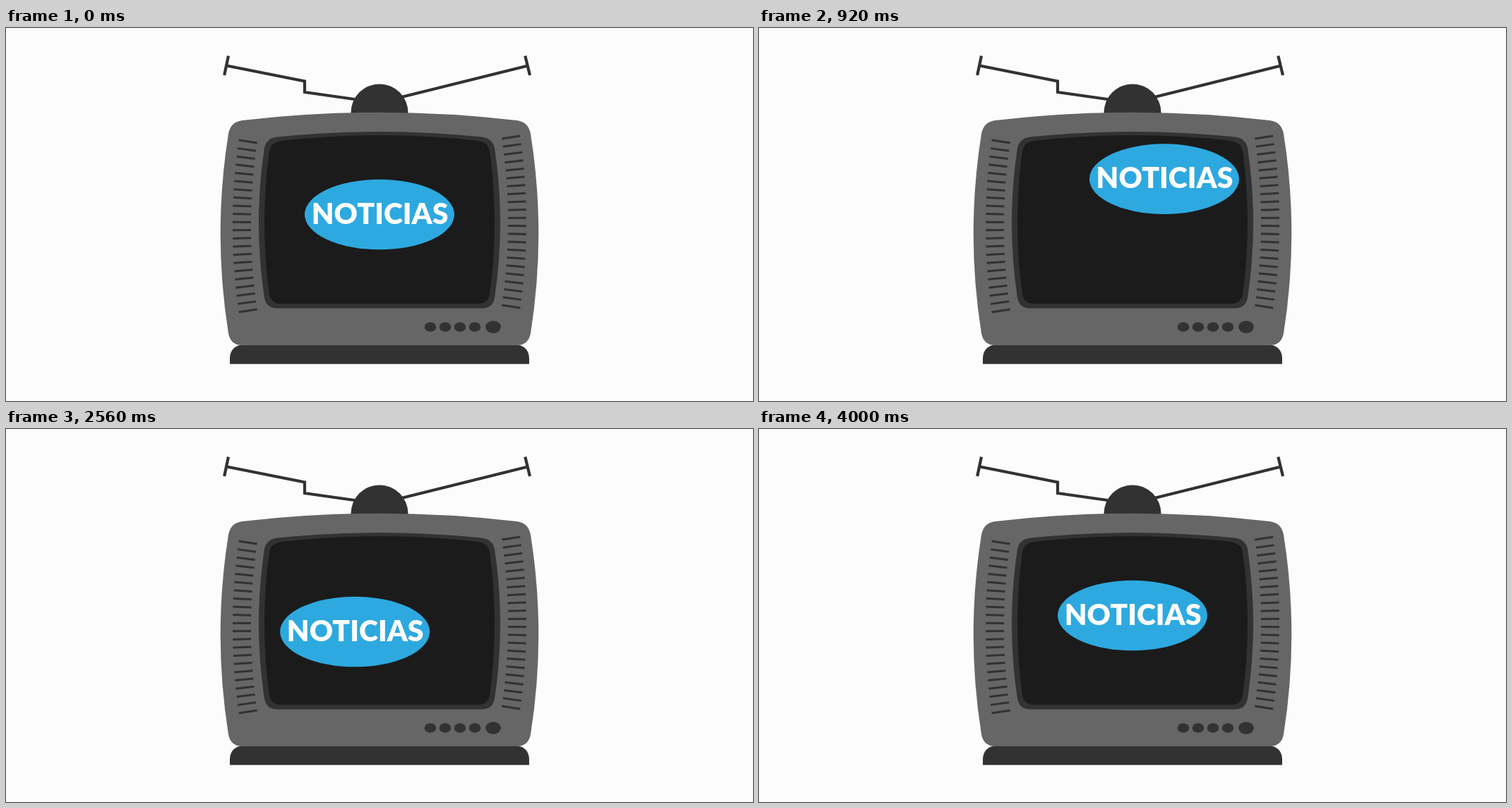
Write an HTML page that moves like this. It is 1058 by 529 pixels and loops after 4040 ms.

```html
<!DOCTYPE html>
<html lang="es">
<head>
<meta charset="utf-8">
<title>Noticias</title>
<style>
  html, body { margin: 0; width: 100%; height: 100%; overflow: hidden; background: #fcfcfc; }
  svg { display: block; width: 100%; height: 100%; }
  text { font: 900 41px Lato, "Open Sans", sans-serif; text-anchor: middle; fill: #fcfcfc; }
</style>
</head>
<body>
<svg viewBox="0 0 1058 529">
  <defs><clipPath id="clip"><path id="clipPath"/></clipPath></defs>
  <g fill="none" stroke="#323232" stroke-width="4.2">
    <path d="M313 53.5L423 75.5V91L497 101.500M315 39.500L309.200 67"/>
    <path d="M558 98.500L739 53.500M735.300 39.500L742 67"/>
  </g>
  <circle cx="529" cy="120" r="40.5" fill="#323232"/>
  <path d="M317 476.500V468Q318 450 337 449H721Q740 450 741 468V476.500Z" fill="#323232"/>
  <path id="body" fill="#666"/>
  <path id="bezel" fill="#323232"/>
  <path id="screen" fill="#1b1b1b"/>
  <g id="vents" stroke="#323232" stroke-width="3"></g>
  <g id="knobs" fill="#323232"></g>
  <g clip-path="url(#clip)">
    <g id="logo">
      <ellipse rx="106" ry="49.800" fill="#2da9e0"/>
      <text x="0.500" y="13">NOTICIAS</text>
    </g>
    <g id="bars" opacity="0"></g>
  </g>
</svg>
<script>
const $ = id => document.getElementById(id);
const LOOP = 4040, STEP = 40, CX = 529;

function add(parent, tag, attrs) {
  const el = document.createElementNS('http://www.w3.org/2000/svg', tag);
  for (const k in attrs) el.setAttribute(k, attrs[k]);
  $(parent).appendChild(el);
}

// Rounded box with a bulging top and sides, symmetric about CX
function panel(flat, side, bulge, top, arch, shoulder, hip, bottom) {
  const l = d => CX - d, r = d => CX + d;
  const mid = (shoulder + hip) / 2, c = side - 3;
  return `M${l(flat)} ${top}Q${CX} ${arch} ${r(flat)} ${top}` +
    `Q${r(c)} ${top + 2} ${r(side)} ${shoulder}Q${r(bulge)} ${mid} ${r(side)} ${hip}` +
    `Q${r(c)} ${bottom} ${r(flat)} ${bottom}H${l(flat)}` +
    `Q${l(c)} ${bottom} ${l(side)} ${hip}Q${l(bulge)} ${mid} ${l(side)} ${shoulder}` +
    `Q${l(c)} ${top + 2} ${l(flat)} ${top}Z`;
}

$('body').setAttribute('d', panel(194, 214, 236.5, 131, 108.5, 150, 433, 450));
$('bezel').setAttribute('d', panel(145, 163, 179, 154.5, 139.5, 170, 383, 397.5));
const glass = panel(140, 156, 170, 160, 144, 174, 378, 391);
$('screen').setAttribute('d', glass);
$('clipPath').setAttribute('d', glass);

function vent(x, y, tilt) {
  add('vents', 'line', { x1: x - 13, y1: y - tilt, x2: x + 13, y2: y + tilt });
}
for (let i = 0; i < 22; i++) {
  const u = i / 10.5 - 1, bow = 8.7 * u * u;
  vent(334 + bow, 281 + 120 * u, -2 * u);
  vent(724 - bow, 275 + 120 * u, 2 * u);
}

for (const x of [601, 622, 643, 664])
  add('knobs', 'ellipse', { cx: x, cy: 424, rx: 8.3, ry: 6.8 });
add('knobs', 'ellipse', { cx: 690, cy: 424, rx: 10.8, ry: 8.7 });

const YELLOW = '#fcee21', BLUE = '#2da9e0', GRAY = '#b3b3b3', GREEN = '#8cc63f', RED = '#c1272d';
const edges = [355, 425, 494, 563, 633, 703];
function barRow(colors, y, height) {
  colors.forEach((fill, i) =>
    add('bars', 'rect', { x: edges[i], y, width: edges[i + 1] - edges[i], height, fill }));
}
barRow([YELLOW, BLUE, GRAY, GREEN, RED], 140, 197);
barRow([RED, GRAY, GREEN, BLUE, YELLOW], 362, 40);

// Logo stops: time, x, y
const stops = [
  [0, 529, 264.5], [1010, 575, 213], [2010, 480, 230.5],
  [2035, 480, 230.5], [3000, 505, 331.3], [4000, 529, 264.5], [LOOP, 529, 264.5]
];
const clamp = v => Math.max(0, Math.min(1, v));
const smooth = u => u * u * (3 - 2 * u);

function logoAt(t) {
  const i = stops.findIndex(s => s[0] > t);
  const [t0, x0, y0] = stops[i - 1], [t1, x1, y1] = stops[i];
  const k = smooth((t - t0) / (t1 - t0));
  return [x0 + (x1 - x0) * k, y0 + (y1 - y0) * k];
}

// Interference: half-strength test card with short fades
const pulse = (t, from, to) => 0.5 * clamp(Math.min(t - from, to - t) / 160);

function draw(t) {
  const [x, y] = logoAt(t);
  $('logo').setAttribute('transform', `translate(${x.toFixed(2)} ${y.toFixed(2)})`);
  $('bars').setAttribute('opacity', pulse(t, 0, 560) + pulse(t, 3440, 4000));
}

const start = performance.now();
function tick() {
  const t = (performance.now() - start) % LOOP;
  draw(Math.floor(t / STEP) * STEP);
  requestAnimationFrame(tick);
}
tick();
</script>
</body>
</html>
```
